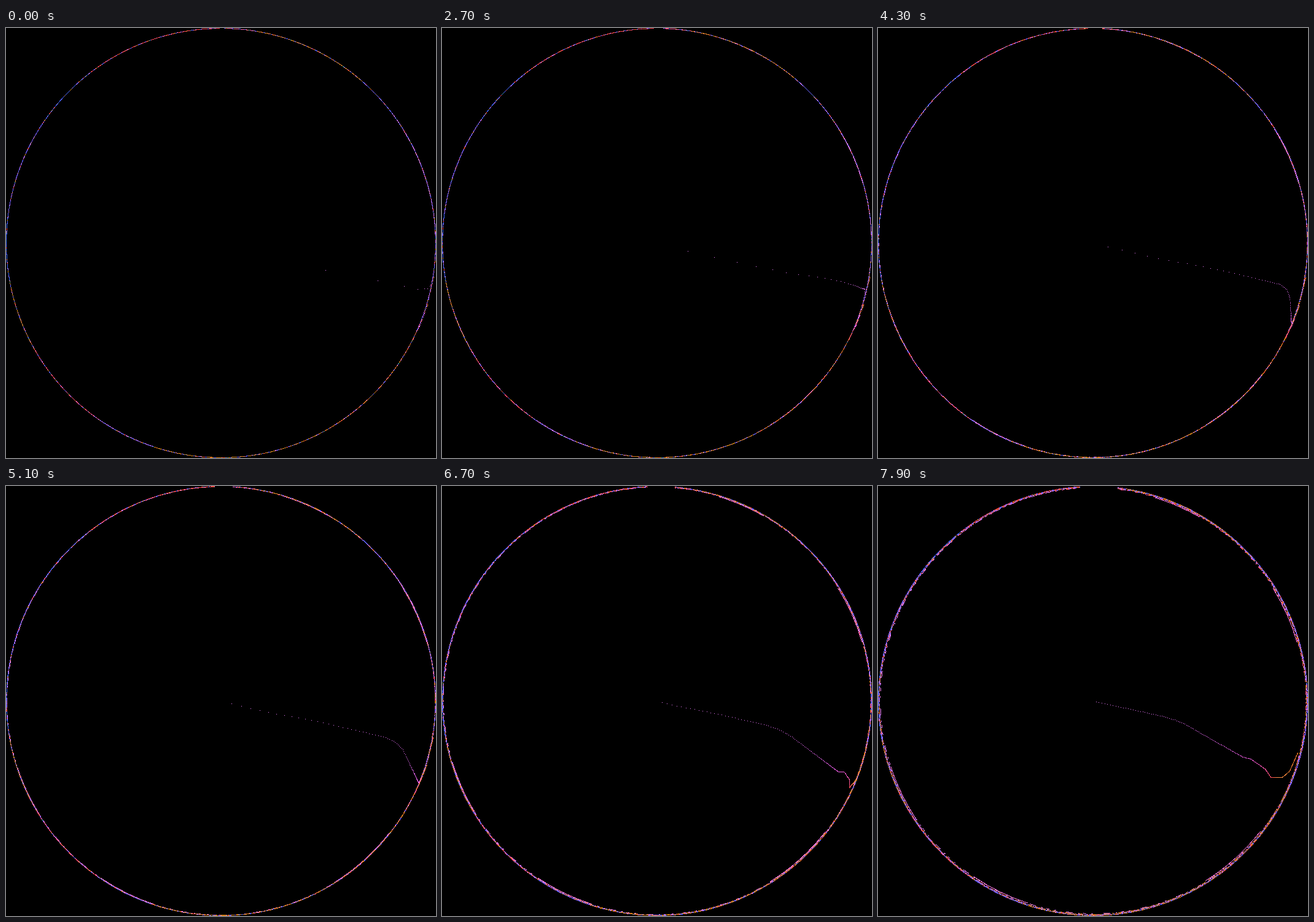
Write an HTML page without scripts that moves like this. It is 700 px wide and 700 px high and loops after 8000 ms.

```html
<!DOCTYPE html>
<html lang="en">
<head>
<meta charset="utf-8">
<title>Chasing dots</title>
<style>
@property --n { syntax: "<number>"; inherits: true; initial-value: 0; }
html, body { margin: 0; width: 100%; height: 100%; overflow: hidden; background: #000; }
svg {
  display: block; width: 700px; height: 700px;
  shape-rendering: crispEdges;
  animation: run 8s steps(80) infinite;
  /* r: share of the way left after each step, e: spread of the rim */
  --r: calc(1 - .5 * exp(-.0452 * var(--n)));
  --e: calc(exp(.0452 * var(--n)) / 36);
}
@keyframes run { from { --n: 0; } to { --n: 80; } }

circle {
  cx: 350px; cy: 350px; fill: none; stroke-width: 1px;
  r: calc(349.5px - var(--d, 0) * var(--e) * 1px);
  transform: translate(calc(var(--a, 0) * var(--e) * 1px), calc(var(--b, 0) * var(--e) * 1px));
}
.speck circle, .deep circle { stroke-dashoffset: calc(var(--n) * var(--v, 0) * 1px); }
.gap {
  transform-origin: 350px 0;
  transform: scaleX(calc(exp(.0271 * var(--n)) / 8.6));
}

/* Each dot closes part of the distance to a target that jumps along the rim */
.dot {
  width: 1px; height: 1px;
  --j: calc(var(--t) + var(--u));
  --s0: calc(1 - pow(var(--r), var(--j)));
  --s1: calc(1 - pow(var(--r), max(0, var(--j) - 1)));
  --s2: calc(1 - pow(var(--r), max(0, var(--j) - 4)));
  --s3: calc(1 - pow(var(--r), max(0, var(--j) - 6)));
  --s4: calc(1 - pow(var(--r), max(0, var(--j) - 9)));
  --s5: calc(1 - pow(var(--r), max(0, var(--j) - 14)));
  --s6: calc(1 - pow(var(--r), max(0, var(--j) - 30)));
  --s7: calc(1 - pow(var(--r), max(0, var(--j) - 35)));
  --s8: calc(1 - pow(var(--r), max(0, var(--j) - 41)));
  --s9: calc(1 - pow(var(--r), max(0, var(--j) - 96)));
  --s10: calc(1 - pow(var(--r), max(0, var(--j) - 108)));
  --s11: calc(1 - pow(var(--r), max(0, var(--j) - 140)));
  --s12: calc(1 - pow(var(--r), max(0, var(--j) - 164)));
  --s13: calc(1 - pow(var(--r), max(0, var(--j) - 211)));
  --s14: calc(1 - pow(var(--r), max(0, var(--j) - 249)));
  --x: calc(350 + 339 * var(--s0) + 2 * var(--s1) + var(--s2) + var(--s3)
    - var(--s4) - var(--s5) - 4 * var(--s6) - 7 * var(--s7) - 7 * var(--s8)
    + 8 * var(--s9) - 10.5 * var(--s10) - 8.5 * var(--s11) + 15 * var(--s12)
    + 9 * var(--s13) + 10 * var(--s14));
  --y: calc(350 + 87 * var(--s0) - 8 * var(--s1) - 5 * var(--s2) - 8 * var(--s3)
    + 5 * var(--s4) + 5 * var(--s5) + 17 * var(--s6) + 21 * var(--s7) + 22 * var(--s8)
    - 22 * var(--s9) + 25 * var(--s10) + 18 * var(--s11) - 33 * var(--s12)
    - 24 * var(--s13) - 45 * var(--s14));
  transform: translate(calc(var(--x) * 1px), calc(var(--y) * 1px));
  fill: hsl(calc(292 + min(92, pow(var(--j), 3) / 70000)) 95% calc(74% - var(--j) * .06%));
}
</style>
</head>
<body>
<svg viewBox="0 0 700 700">
  <defs>
    <g id="row">
      <rect class="dot" style="--u:1"/><rect class="dot" style="--u:2"/>
      <rect class="dot" style="--u:3"/><rect class="dot" style="--u:4"/>
      <rect class="dot" style="--u:5"/><rect class="dot" style="--u:6"/>
      <rect class="dot" style="--u:7"/><rect class="dot" style="--u:8"/>
      <rect class="dot" style="--u:9"/><rect class="dot" style="--u:10"/>
      <rect class="dot" style="--u:11"/><rect class="dot" style="--u:12"/>
      <rect class="dot" style="--u:13"/><rect class="dot" style="--u:14"/>
      <rect class="dot" style="--u:15"/><rect class="dot" style="--u:16"/>
      <rect class="dot" style="--u:17"/><rect class="dot" style="--u:18"/>
      <rect class="dot" style="--u:19"/><rect class="dot" style="--u:20"/>
    </g>
  </defs>

  <!-- loose strands -->
  <g stroke="#ff78e0">
    <circle pathLength="360" stroke-dasharray="20 340" stroke-dashoffset="-38" style="--d:1.7;--a:-1.8;--b:-1.8"/>
    <circle pathLength="360" stroke-dasharray="16 344" stroke-dashoffset="-108" style="--d:1.7;--a:.9;--b:-2"/>
    <circle pathLength="360" stroke-dasharray="14 346" stroke-dashoffset="-148" style="--d:1.7;--a:1.6;--b:-.8"/>
    <circle pathLength="360" stroke-dasharray="16 344" stroke-dashoffset="-328" style="--d:1.7;--a:-2;--b:.8"/>
    <circle pathLength="360" stroke-dasharray="13 347" stroke-dashoffset="-287" style="--d:1.7;--a:-.8;--b:1.6"/>
  </g>

  <!-- layers that sink inward -->
  <g class="deep">
    <circle stroke="#f080ff" stroke-dasharray="5 6 2 9 11 17 3 8" style="--d:2.7;--a:.6;--b:-.5;--v:3"/>
    <circle stroke="#ff4a80" stroke-dasharray="7 5 3 11 4 8 2 4" style="--d:2.2;--a:-.5;--b:.3;--v:-4"/>
    <circle stroke="#d88410" stroke-dasharray="6 2 11 4 3 5 8 3" style="--d:1.8;--a:-.3;--b:-.3;--v:-3"/>
    <circle stroke="#b470ff" stroke-dasharray="4 3 7 5 2 6" style="--d:1.6;--a:.3;--b:.2;--v:2"/>
    <circle stroke="#e85a28" stroke-dasharray="9 3 4 2 7 3 5 2" style="--d:1;--a:.2;--b:.2;--v:5"/>
    <circle stroke="#6c60ff" stroke-dasharray="6 3 5 2 8 4 3 5" style="--d:.9;--v:4"/>
  </g>

  <!-- coloured rim -->
  <g>
    <circle pathLength="360" stroke="#9a68ff" stroke-dasharray="24 336"/>
    <circle pathLength="360" stroke="#e0702c" stroke-dasharray="37 323" stroke-dashoffset="-24"/>
    <circle pathLength="360" stroke="#d88420" stroke-dasharray="48 312" stroke-dashoffset="-61"/>
    <circle pathLength="360" stroke="#8a60f4" stroke-dasharray="16 344" stroke-dashoffset="-109"/>
    <circle pathLength="360" stroke="#ff4c78" stroke-dasharray="25 335" stroke-dashoffset="-125"/>
    <circle pathLength="360" stroke="#c88438" stroke-dasharray="20 340" stroke-dashoffset="-150"/>
    <circle pathLength="360" stroke="#3868ff" stroke-dasharray="18 342" stroke-dashoffset="-170"/>
    <circle pathLength="360" stroke="#8060ff" stroke-dasharray="27 333" stroke-dashoffset="-188"/>
    <circle pathLength="360" stroke="#4468ff" stroke-dasharray="17 343" stroke-dashoffset="-215"/>
    <circle pathLength="360" stroke="#ff4654" stroke-dasharray="38 322" stroke-dashoffset="-232"/>
    <circle pathLength="360" stroke="#ff64a0" stroke-dasharray="9 351" stroke-dashoffset="-270"/>
    <circle pathLength="360" stroke="#d8802c" stroke-dasharray="32 328" stroke-dashoffset="-279"/>
    <circle pathLength="360" stroke="#7068ff" stroke-dasharray="12 348" stroke-dashoffset="-311"/>
    <circle pathLength="360" stroke="#cc78ff" stroke-dasharray="37 323" stroke-dashoffset="-323"/>
  </g>
  <g class="speck">
    <circle stroke="#ff4438" stroke-dasharray="2 11 1 17 3 9 2 23" style="--v:5"/>
    <circle stroke="#d08818" stroke-dasharray="1 8 3 17 2 12 1 21" style="--v:4"/>
    <circle stroke="#f080f4" stroke-dasharray="2 13 1 7 3 25 1 10" style="--v:-3"/>
    <circle stroke="#5a60ff" stroke-dasharray="3 9 2 6 2 15 4 11" style="--v:-7"/>
    <circle stroke="#38988c" stroke-dasharray="1 41 2 67 1 53" style="--v:6"/>
  </g>

  <rect class="gap" x="329" y="0" width="61" height="9"/>

  <g>
    <use href="#row" style="--t:0"/><use href="#row" style="--t:20"/>
    <use href="#row" style="--t:40"/><use href="#row" style="--t:60"/>
    <use href="#row" style="--t:80"/><use href="#row" style="--t:100"/>
    <use href="#row" style="--t:120"/><use href="#row" style="--t:140"/>
    <use href="#row" style="--t:160"/><use href="#row" style="--t:180"/>
    <use href="#row" style="--t:200"/><use href="#row" style="--t:220"/>
    <use href="#row" style="--t:240"/><use href="#row" style="--t:260"/>
    <use href="#row" style="--t:280"/>
  </g>
</svg>
</body>
</html>
```
